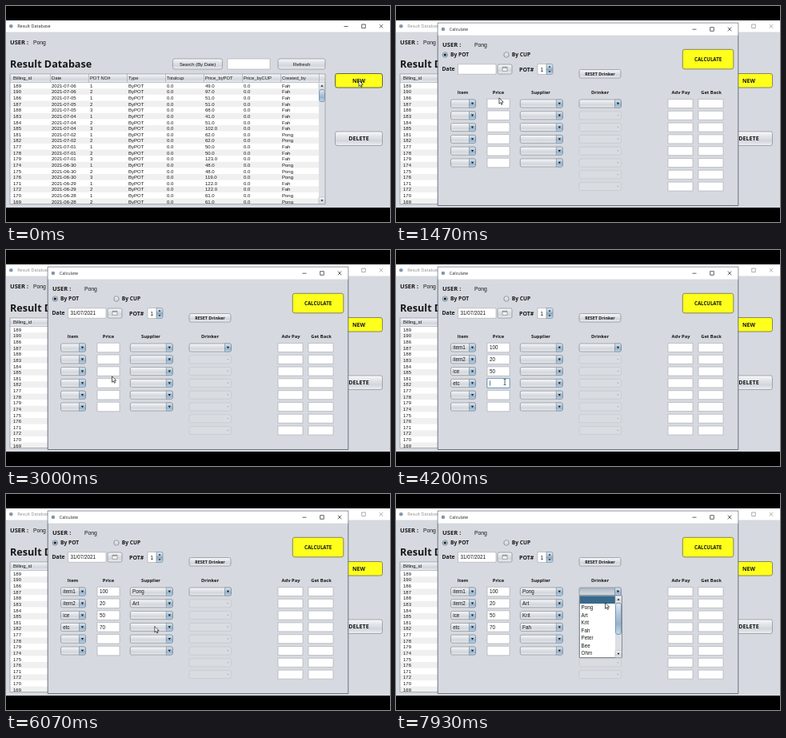
Animation of 480 by 270 pixels, one loop 8000 ms. Source, as an HTML page with a canvas:

```html
<!DOCTYPE html>
<html lang="en">
<head>
<meta charset="utf-8">
<title>Result Database</title>
<style>
html, body { margin: 0; width: 100%; height: 100%; overflow: hidden; background: #000; }
canvas { display: block; width: 480px; height: 270px; }
</style>
</head>
<body>
<canvas id="stage"></canvas>
<script>
const LOOP = 8000;
const canvas = document.getElementById('stage');
const ctx = canvas.getContext('2d');
const dpr = window.devicePixelRatio || 1;
canvas.width = 480 * dpr;
canvas.height = 270 * dpr;

const PLAIN = '"Liberation Sans", sans-serif';
const HEAVY = '"Open Sans", "Noto Sans", sans-serif';
const PANEL = '#d6d9df';
const YELLOW = '#ffff1c';
const USER = 'Pong';
const PEOPLE = ['', USER, 'Art', 'Krit', 'Fah', 'Peter', 'Bee', 'Ohm'];
const ITEMS = ['item1', 'item2', 'ice', 'etc'];
const ROW = 14.8;
const rowY = i => 122 + i * ROW;

// Billing rows, one group per day: date, last-to-first ids, prices, author
const DAYS = [
  ['2021-07-06', [189, 190], [49, 97], 'Fah'],
  ['2021-07-05', [186, 187, 188], [51, 51, 68], 'Fah'],
  ['2021-07-04', [183, 184, 185], [41, 51, 102], 'Fah'],
  ['2021-07-02', [181, 182], [62, 62], USER],
  ['2021-07-01', [177, 178, 179], [50, 50, 123], 'Fah'],
  ['2021-06-30', [174, 175, 176], [48, 48, 119], USER],
  ['2021-06-29', [171, 172], [122, 122], 'Fah'],
  ['2021-06-28', [170, 169], [61, 61], USER]
];
const HEADERS = ['Billing_id', 'Date', 'POT NO#', 'Type', 'Totalcup', 'Price_byPOT', 'Price_byCUP', 'Created_by'];
const BILLS = DAYS.flatMap(([date, ids, prices, by]) => ids.map((id, i) =>
  [id, date, i + 1, 'ByPOT', '0.0', prices[i].toFixed(1), '0.0', by]));

// Pointer path: time, x, y
const PATH = [
  [0, 441, 93], [870, 441, 93], [1120, 125.5, 136], [1270, 125.5, 136],
  [1730, 134, 84], [1870, 134, 84], [1930, 136, 77], [2070, 136, 77],
  [2200, 112.5, 107], [2400, 114, 120], [2850, 134, 170], [2960, 134, 170],
  [3060, 130, 137], [3460, 130, 137], [3560, 130, 152], [3870, 132, 152],
  [4130, 136, 165], [4600, 136, 165], [4730, 160, 163], [5000, 203, 122],
  [5130, 203, 122], [5300, 184, 143], [5400, 183, 145], [5470, 183, 145],
  [5540, 203, 137], [5670, 195, 142], [5930, 184, 167], [6040, 184, 167],
  [6200, 203, 152], [6290, 203, 152], [6480, 186, 190], [6570, 186, 190],
  [6660, 181.5, 167], [6770, 181.5, 167], [6930, 186, 184], [7150, 185, 215],
  [7240, 185, 215], [7500, 276, 121], [7700, 276, 121], [7860, 272, 124],
  [7930, 261.5, 136], [8000, 261.5, 136]
];

// Opened lists: from, to, left edge, row
const LISTS = [
  [5060, 5460, 155, 0], [5540, 6040, 155, 1], [6230, 6570, 155, 2],
  [6740, 7240, 155, 3], [7600, LOOP, 229, 0]
];

// Typed prices: focus time, blur time, then the time of each key
const PRICES = [
  ['100', 0, 0, 3060, 3060, 3060],
  ['20', 3060, 3500, 3270, 3330],
  ['50', 3500, 3870, 3660, 3730],
  ['70', 3870, 5000, 4470, 4530]
];

function pointer(t) {
  const i = PATH.findIndex(p => p[0] > t);
  const [t0, x0, y0] = PATH[i - 1];
  const [t1, x1, y1] = PATH[i];
  const k = (t - t0) / (t1 - t0);
  const e = k * k * (3 - 2 * k);
  return { x: x0 + (x1 - x0) * e, y: y0 + (y1 - y0) * e };
}

function text(s, x, y, size = 6, { bold = false, font = bold ? HEAVY : PLAIN, color = '#161616', align = 'left' } = {}) {
  ctx.font = `${bold ? 700 : 400} ${size}px ${font}`;
  ctx.textAlign = align;
  ctx.fillStyle = color;
  ctx.fillText(s, x, y + size * 0.36);
}

function rect(x, y, w, h, color) {
  ctx.fillStyle = color;
  ctx.fillRect(x, y, w, h);
}

function box(x, y, w, h, fill, stroke, r = 0, line = 0.7) {
  ctx.beginPath();
  ctx.roundRect(x, y, w, h, r);
  ctx.fillStyle = fill;
  ctx.fill();
  if (!stroke) return;
  ctx.strokeStyle = stroke;
  ctx.lineWidth = line;
  ctx.stroke();
}

function shade(y, h, ...colors) {
  const g = ctx.createLinearGradient(0, y, 0, y + h);
  colors.forEach((c, i) => g.addColorStop(i / (colors.length - 1), c));
  return g;
}
const silver = (y, h) => shade(y, h, '#fafbfc', '#e2e5e9', '#d2d6dc', '#edf0f3');
const blue = (y, h) => shade(y, h, '#e2ebf3', '#b5cadd', '#97b3cd', '#c6dbec');

function button(label, x, y, w, h, size, bold = false) {
  box(x, y, w, h, silver(y, h), '#858a93', 2.5);
  text(label, x + w / 2, y + h / 2, size, { bold, align: 'center' });
}

function yellowButton(label, x, y, w, h, size, fill = YELLOW, edge = '#7d7d55') {
  box(x, y, w, h, fill, edge, 2.5, 0.9);
  text(label, x + w / 2, y + h / 2, size, { bold: true, align: 'center' });
}

function field(x, cy, w, h, value = '', focused = false) {
  if (focused) box(x - 0.6, cy - h / 2 - 0.6, w + 1.2, h + 1.2, '#73a4d1', null, 1);
  box(x, cy - h / 2, w, h, '#fff', focused ? '#5c87ae' : '#a3a7ae', 0, 0.6);
  text(value, x + 3, cy + 0.2, 6.3);
  if (focused) rect(x + 3 + ctx.measureText(value).width, cy - 3, 0.6, 6.4, '#111');
}

function triangle(x, y, dir, size = 1.7, color = '#1c1c1c') {
  ctx.beginPath();
  ctx.moveTo(x - size, y - dir * size * 0.7);
  ctx.lineTo(x + size, y - dir * size * 0.7);
  ctx.lineTo(x, y + dir * size * 0.8);
  ctx.fillStyle = color;
  ctx.fill();
}

function combo(x, cy, w, value = '', state = '') {
  const y = cy - 5;
  if (state === 'off') {
    box(x, y, w, 10, '#d9dce1', '#c0c4ca', 2, 0.6);
    triangle(x + w - 4, cy, 1, 1.3, '#b4b8be');
    return;
  }
  box(x, y, w, 10, state === 'open' ? shade(y, 10, '#a9b4bf', '#c3cbd4', '#d5dbe2') : silver(y, 10), '#858a93', 2);
  box(x + w - 8, y, 8, 10, blue(y, 10), '#6e8093', [0, 2, 2, 0], 0.6);
  triangle(x + w - 4, cy, 1);
  text(value, x + 2.8, cy, 6.3);
}

function scrollbar(x, y, h, thumbH) {
  rect(x, y, 8, h, '#dcdfe4');
  for (const [top, dir] of [[y, -1], [y + h - 8.5, 1]]) {
    box(x, top, 8, 8.5, silver(top, 8.5), '#a2a7ae', 0, 0.5);
    triangle(x + 4, top + 4.2, dir, 1.5);
  }
  box(x + 0.5, y + 9, 7, thumbH, blue(y + 9, thumbH), '#5e7c99', 2.5);
}

function spinner(x, cy, h) {
  box(x, cy - h / 2, 8, h, blue(cy - h / 2, h), '#6e8093', [0, 2, 2, 0], 0.6);
  rect(x, cy - 0.3, 8, 0.6, '#6e8093');
  triangle(x + 4, cy - h / 4, -1, 1.4);
  triangle(x + 4, cy + h / 4, 1, 1.4);
}

function titleBar(title, x, y, w, h, cy, controls, color) {
  rect(x, y, w, h, '#fff');
  ctx.beginPath();
  ctx.arc(x + 6.3, cy, 2.3, 0, 7);
  ctx.fillStyle = '#8296ab';
  ctx.fill();
  text(title, x + 14.2, cy, 5.5, { font: HEAVY, color });
  const [min, max, close] = controls;
  ctx.strokeStyle = color;
  ctx.lineWidth = 0.7;
  ctx.beginPath();
  ctx.moveTo(min - 2.5, cy + 0.2);
  ctx.lineTo(min + 2.5, cy + 0.2);
  ctx.rect(max - 2.3, cy - 2.3, 4.6, 4.6);
  for (const s of [-1, 1]) {
    ctx.moveTo(close - 2.3, cy - 2.3 * s);
    ctx.lineTo(close + 2.3, cy + 2.3 * s);
  }
  ctx.stroke();
}

function table() {
  const top = 95.6, step = 7.63;
  rect(5, 85, 394, 162.5, '#fff');
  rect(5, 85, 394, 10.5, silver(85, 10.5));
  BILLS.forEach((bill, i) => {
    const y = top + i * step;
    if (i % 2) rect(5, y, 386, Math.min(step, 247.5 - y), '#f0f0f1');
    bill.forEach((v, c) => text(v, 9 + c * 48, y + 4, 6));
  });
  HEADERS.forEach((s, c) => {
    text(s, 9 + c * 48, 90.2, 5.8);
    rect(55 + c * 48, 85, 0.6, 10.5, '#9da2aa');
  });
  rect(5, 95.2, 394, 0.6, '#9da2aa');
  scrollbar(391, 95.5, 152, 15);
  ctx.strokeStyle = '#8f949c';
  ctx.lineWidth = 0.7;
  ctx.strokeRect(5, 85, 394, 162.5);
}

function mainWindow(t) {
  rect(0, 18, 480, 234, PANEL);
  titleBar('Result Database', 0, 18, 480, 14.5, 25.3, [425, 447, 469], t < 1000 ? '#222' : '#8c8c8c');
  text('USER :', 5, 45.6, 7.5, { bold: true });
  text(USER, 34, 45.8, 6.8);
  text('Result Database', 5, 72.3, 12.6, { bold: true });
  button('Search (By Date)', 208.5, 66, 62, 13, 5.9);
  field(277, 72.5, 53, 13);
  button('Refresh', 340, 66, 59, 13, 6.2);
  table();
  const pressed = t >= 530 && t < 600;
  yellowButton('NEW', 411.5, 84.5, 59, 17.5, 6.8, pressed ? '#e6e619' : YELLOW, t < 1270 ? '#55583c' : '#7d7d55');
  button('DELETE', 411.5, 157, 59, 17.5, 7.1, true);
}

function radio(x, y, label, on) {
  ctx.beginPath();
  ctx.arc(x, y, 3.2, 0, 7);
  ctx.fillStyle = on ? blue(y - 3, 6) : silver(y - 3, 6);
  ctx.fill();
  ctx.strokeStyle = '#6f757e';
  ctx.lineWidth = 0.7;
  ctx.stroke();
  if (on) {
    ctx.beginPath();
    ctx.arc(x, y, 1.4, 0, 7);
    ctx.fillStyle = '#111';
    ctx.fill();
  }
  text(label, x + 6.8, y, 6.6, { bold: true });
}

function form(t) {
  text('USER :', 58, 48, 7.6, { bold: true });
  text(USER, 98, 48.6, 6.8);
  radio(61.3, 61, 'By POT', true);
  radio(138, 61, 'By CUP', false);
  text('Date', 57.5, 79, 6.8, { bold: true });
  field(77.5, 79, 47.5, 12.5, t >= 2930 ? '31/07/2021' : '');
  box(127, 73, 18, 12, silver(73, 12), '#858a93', 2);
  box(133, 76.3, 6, 5, '#f7f7f7', '#777', 0, 0.6);
  rect(133, 76.3, 6, 1.4, '#8a9099');
  text('POT#', 154, 79, 7, { bold: true });
  box(177, 72.5, 12, 13, '#fff', '#a3a7ae', 0, 0.6);
  text('1', 180.5, 79.2, 6.5);
  spinner(188, 79, 13);
  button('RESET Drinker', 229, 79.5, 52, 10.5, 5.4, true);
  yellowButton('CALCULATE', 358.3, 54.3, 63.5, 24.5, 6.1);

  const heads = [['Item', 83.5], ['Price', 128], ['Supplier', 181], ['Drinker', 255], ['Adv Pay', 356], ['Get Back', 394]];
  for (const [s, x] of heads) text(s, x, 108.3, 5.8, { bold: true, align: 'center' });

  const list = LISTS.find(l => t >= l[0] && t < l[1]);
  const isOpen = (x, row) => list && list[2] === x && list[3] === row ? 'open' : '';
  for (let i = 0; i < 8; i++) {
    const y = rowY(i);
    if (i < 6) {
      combo(68.5, y, 31, t >= 3060 ? ITEMS[i] : '');
      const [value, focus, blur, ...keys] = PRICES[i] || [''];
      const typed = keys.filter(k => t >= k).length;
      field(114, y, 28, 11.5, value.slice(0, typed), t >= focus && t < blur);
      const chosen = i < 4 && t >= LISTS[i][1] ? PEOPLE[i + 1] : '';
      combo(155.3, y, 53, chosen, isOpen(155, i));
    }
    combo(229, y, 52.5, '', i ? 'off' : isOpen(229, 0));
    field(340, y, 31, 11);
    field(378, y, 31, 11);
  }
  if (list) dropdown(list[2], rowY(list[3]) + 5, pointer(t).y);
}

function dropdown(x, y, cy) {
  const step = 9.55, h = 77.6;
  const hot = Math.max(0, Math.min(7, Math.round((cy - y - 5) / step)));
  box(x + 0.3, y, 53, h, '#fff', '#555b63', 0, 0.8);
  rect(x + 0.8, y + 0.5 + hot * step, 44.5, step, '#39698a');
  PEOPLE.forEach((name, i) =>
    text(name, x + 2.6, y + 5.2 + i * step, 6.3, { color: i === hot ? '#fff' : '#161616' }));
  scrollbar(x + 45, y + 0.4, h - 0.8, 39);
}

function calendar() {
  box(-4, 89, 150.3, 105.3, '#dde0e5', '#6e737b', 0, 0.8);
  box(-4, 90, 12, 12, silver(90, 12), '#858a93');
  spinner(4, 96, 12);
  box(12, 90, 125, 12, '#fbfbfc', '#b3b7bd', 0, 0.5);
  text('2021', 136, 96.2, 6.3, { align: 'right' });
  spinner(137, 96, 12);
  ['Mon', 'Tue', 'Wed', 'Thu', 'Fri', 'Sat'].forEach((d, i) => {
    const x = 15 + i * 23.8;
    box(x - 11, 104, 22, 10, '#e8ebef', '#c2c8d0', 1, 0.5);
    text(d, x, 109, 5.8, { align: 'center', color: '#365a80' });
  });
  for (let day = 1; day <= 31; day++) {
    const slot = day + 3;
    const x = -8.8 + (slot % 7) * 23.8;
    const y = 122 + Math.floor(slot / 7) * 12.8;
    const fill = day === 7 ? shade(y - 5, 10, '#a9adb3', '#c1c4c9') : silver(y - 5, 10);
    box(x - 10.8, y - 5, 21.6, 10, fill, '#989da5', 2, 0.6);
    if (slot % 7) text(day, x, y, 6, { align: 'center' });
  }
}

function dialog(t) {
  if (t < 1060) return;
  const ready = t >= 1270;
  ctx.save();
  if (!ready) {
    const k = Math.min(1, (t - 1060) / 70);
    const s = 0.95 + 0.038 * k;
    ctx.globalAlpha = 0.4 + 0.38 * k;
    ctx.translate(240, 135.5);
    ctx.scale(s, s);
    ctx.translate(-240, -135.5);
  }
  box(52.2, 21.2, 375.6, 228.3, ready ? PANEL : '#f4f5f6', '#5e6a76', 0, 0.9);
  if (!ready) ctx.globalAlpha = 1;
  titleBar('Calculate', 52.6, 21.6, 374.8, 15, 29, [373, 395, 417], '#222');
  if (ready) form(t);
  ctx.restore();
  if (t >= 2070 && t < 2930) calendar();
}

function arrow(x, y) {
  const outline = [[0, 0], [0, 7.4], [1.7, 5.8], [2.9, 8.4], [4.1, 7.8], [3, 5.4], [5.2, 5.2]];
  ctx.beginPath();
  outline.forEach(([dx, dy]) => ctx.lineTo(x + dx, y + dy));
  ctx.closePath();
  ctx.fillStyle = '#fff';
  ctx.fill();
  ctx.strokeStyle = '#111';
  ctx.lineWidth = 0.7;
  ctx.stroke();
}

function textCursor(x, y) {
  rect(x - 0.35, y - 3.6, 0.7, 7.2, '#222');
  for (const dy of [-3.8, 3.2]) rect(x - 1.5, y + dy, 3, 0.6, '#222');
}

function draw(t) {
  ctx.setTransform(dpr, 0, 0, dpr, 0, 0);
  rect(0, 0, 480, 270, '#000');
  mainWindow(t);
  dialog(t);
  const { x, y } = pointer(t);
  const overPrice = t >= 3060 && t < 4680;
  (overPrice ? textCursor : arrow)(x, y);
}

function tick() {
  draw(performance.now() % LOOP);
  requestAnimationFrame(tick);
}
tick();
</script>
</body>
</html>
```
